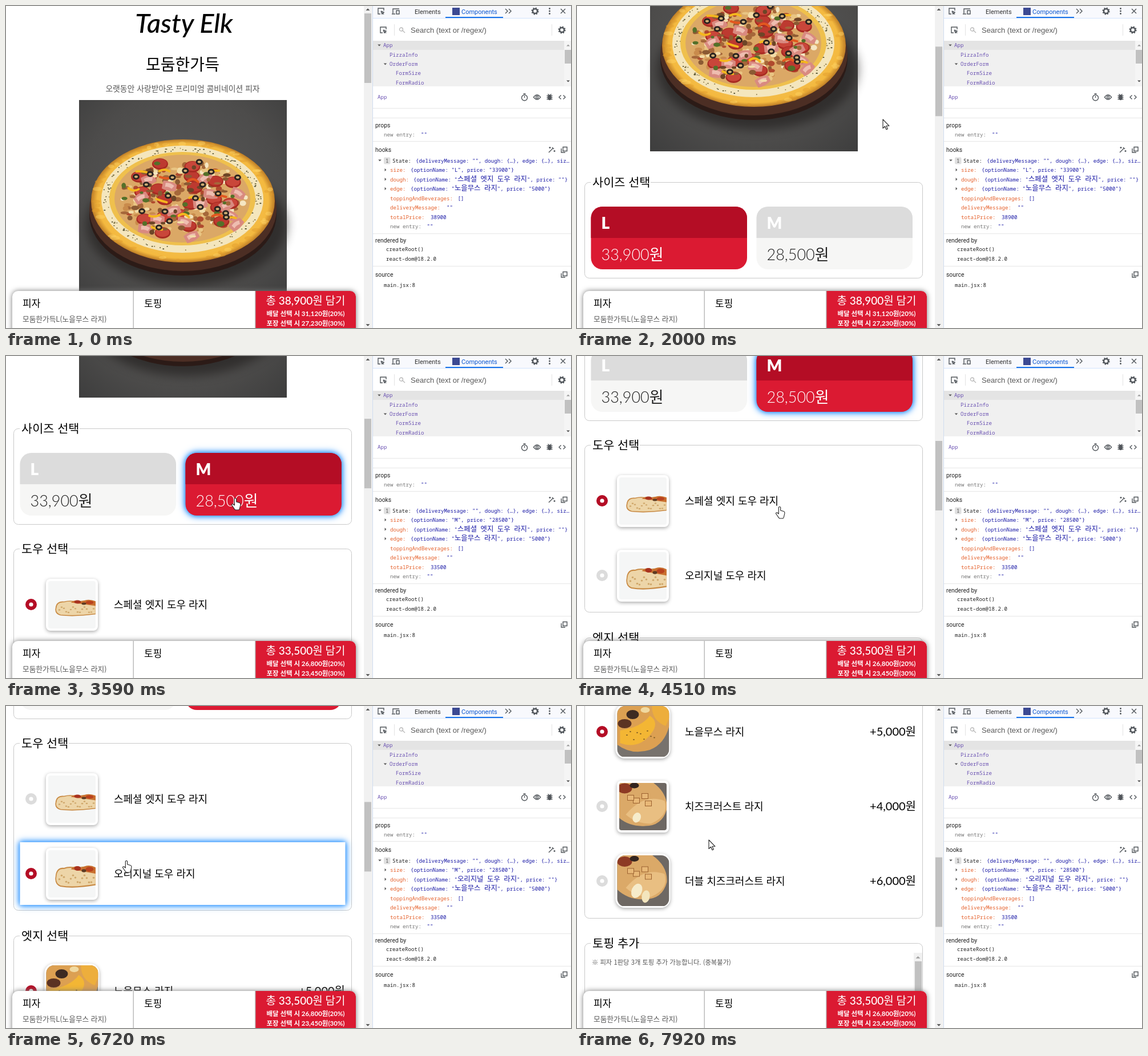
These frames come from a looping animation (990 by 565 pixels, 8000 ms). An HTML page:

```html
<!DOCTYPE html>
<html lang="ko">
<head>
<meta charset="utf-8">
<title>Pizza order form</title>
<style>
html, body { margin: 0; width: 100%; height: 100%; overflow: hidden; background: #fff; }
svg { display: block; }
text { white-space: pre; font-family: "Noto Sans CJK KR", sans-serif; }
.num { font-family: Lato, "Noto Sans CJK KR", sans-serif; }
.ui { font-family: Roboto, sans-serif; }
.arial { font-family: "Liberation Sans", Arial, sans-serif; }
.mono { font-family: "Noto Sans Mono", "Noto Sans CJK KR", monospace; font-size: 9.16px; }
.ko { font-family: "Noto Sans CJK KR", sans-serif; font-size: 12.4px; word-spacing: 3px; }
.glow { filter: drop-shadow(0 0 4px #2b95ff) drop-shadow(0 0 6px #4aa3ff); }
.card { filter: drop-shadow(0 2px 3px #0005); }
.icon { fill: none; stroke: #50555a; stroke-width: 1.4; }
</style>
</head>
<body>
<svg id="stage" width="990" height="565" viewBox="0 0 990 565"></svg>
<script>
const LOOP = 8000;
const RED = '#db1a32', DARK_RED = '#b40d25', GRAY = '#dcdcdc', BLUE = '#1a1aa6', ORANGE = '#e5602b', PURPLE = '#6a51b2';

// Moments of the two clicks and of the later inspector refreshes
const STEPS = [2700, 3590, 5410, 5710];
const SCROLL = [[1440, 0], [1800, 273], [2060, 273], [2480, 455], [3850, 455], [4510, 637],
  [4760, 637], [5010, 728], [6900, 728], [7720, 1183]];
const POINTER = [[180, 842, 462], [980, 561, 171], [1180, 561, 171], [1380, 538, 188], [1800, 538, 188],
  [2000, 536, 199], [2120, 536, 199], [2600, 402, 249], [3860, 402, 249], [4500, 355, 264],
  [4620, 355, 264], [5010, 206, 278], [5190, 206, 278], [5210, 206, 275], [6700, 206, 275],
  [6720, 211, 271], [6920, 211, 271], [7720, 219, 261], [7780, 219, 261], [7920, 231, 235]];

let seed = 11;
const rand = (a = 0, b = 1) => a + (b - a) * ((seed = seed * 16807 % 2147483647) / 2147483647);
const pick = list => list[Math.floor(rand(0, list.length))];
const repeat = (n, make) => Array.from({ length: n }, (_, i) => make(i)).join('');

const rect = (x, y, w, h, fill, more = '') => `<rect x="${x}" y="${y}" width="${w}" height="${h}" fill="${fill}" ${more}/>`;
const oval = (x, y, rx, ry, fill, more = '') => `<ellipse cx="${x}" cy="${y}" rx="${rx}" ry="${ry}" fill="${fill}" ${more}/>`;
const path = (d, fill, more = '') => `<path d="${d}" fill="${fill}" ${more}/>`;
const text = (x, y, s, size, css = '', cls = '') => `<text x="${x}" y="${y}" class="${cls}" style="font-size:${size}px;${css}">${s}</text>`;
const mono = (x, y, s, color) => `<text x="${x}" y="${y}" class="mono" fill="${color}">${
  s.replace(/[가-힣][가-힣 ]*/g, m => `<tspan class="ko">${m}</tspan>`)}</text>`;
const icon = (x, y, d) => `<path class="icon" transform="translate(${x} ${y})" d="${d}"/>`;
const tri = (x, y, w, turn, fill) => path(`M${-w} ${-w / 2}h${2 * w}l${-w} ${w}z`, fill, `transform="translate(${x} ${y}) rotate(${turn})"`);
const line = (y, x = 643) => rect(x, y, 990 - x, 1, '#e6e6e6');
const gear = (x, y) => `<g fill="none" stroke="#50555a" transform="translate(${x} ${y})">
  <circle r="4" stroke-width="2.4"/><circle r="5.6" stroke-width="2" stroke-dasharray="2.2 2.2"/></g>`;

function pizza() {
  const inside = (i, n) => {
    const a = i * 2.4, r = Math.sqrt((i + .5) / n);
    return [309 + 106 * r * Math.cos(a), 338 + 66 * r * Math.sin(a)];
  };
  const scatter = (n, make) => repeat(n, i => make(...inside(i + rand(0, .4), n)));
  const blob = colors => (x, y) => oval(x + rand(-7, 7), y + rand(-4, 4), rand(3, 7), rand(2, 5), pick(colors));
  const ring = repeat(130, () => {
    const a = rand(0, 6.28), k = rand(.94, 1.03);
    return oval(309 + 136 * k * Math.cos(a), 338.5 + 88 * k * Math.sin(a), rand(.7, 2), .9, pick(['#4b4a2c', '#6d6438', '#8d7c4d']));
  });
  const crust = repeat(60, () => {
    const a = rand(0, 6.28), k = rand(.92, .97);
    return oval(310 + 161 * k * Math.cos(a), 342 + 108 * k * Math.sin(a), rand(3, 9), rand(2, 4), pick(['#ffd566', '#e09c2c']), 'opacity=".45"');
  });
  return rect(128, 165, 364, 363, 'url(#slate)')
    + oval(316, 384, 176, 106, '#1d1a19', 'opacity=".6" style="filter:blur(9px)"')
    + oval(310, 366, 164, 107, '#2c1b17') + oval(310, 357, 164, 108, '#4c2e24')
    + oval(310, 342, 161, 108, 'url(#crust)') + crust
    + oval(309, 339, 142, 94, '#f4e6bd') + ring
    + oval(309, 338, 128, 82, '#efc04d') + oval(309, 338, 119, 77, '#dba866')
    + scatter(190, blob(['#f2dda8', '#e9c583', '#8b5a33', '#a5673a', '#c98b4c', '#f5e6c2', '#b04a2e']))
    + scatter(21, (x, y) => oval(x, y, 14, 10, '#a82a22') + oval(x, y - 1, 12, 8, pick(['#c9463a', '#bd3a30'])))
    + scatter(15, (x, y) => `<g transform="translate(${x + 12} ${y + 9}) rotate(${rand(-40, 40)})">${
      path('M-13 -7Q0 -11 12 -6L13 5Q0 10 -12 7Z', '#d98a80')}${path('M-8 -4Q0 -7 8 -3L5 3Q-2 0 -7 3Z', '#eebdb0')}</g>`)
    + scatter(55, blob(['#8b5a33', '#6d4527', '#f2dda8', '#a5673a', '#547029']))
    + scatter(14, (x, y) => path(`M${x - 9} ${y - 4}q9 ${rand(-9, 9)} 18 ${rand(-2, 6)}`, 'none', `stroke="${pick(['#f5b71e', '#f5b71e', '#e2571f'])}" stroke-width="4" stroke-linecap="round"`))
    + scatter(20, (x, y) => oval(x + 6, y - 8, 4.5, 3.6, '#cfae74', 'stroke="#2a2320" stroke-width="3"'));
}

// Thumbnails are drawn around their own centre
function slice(big) {
  const h = big ? 1.35 : 1;
  return rect(-42, -42, 84, 84, '#f5f6f6') + `<g transform="translate(0 ${big ? 4 : 5}) scale(1 ${h})">`
    + path('M-28 1Q-27 -11 -14 -10Q-4 -13 10 -10Q26 -14 42 -9V11Q5 16 -20 13Q-30 10 -28 1Z', '#edd5a8', 'stroke="#c88a44" stroke-width="1.6"')
    + repeat(16, i => oval(-22 + i * 4, 4 + Math.sin(i * 5) * 5, 1.8, 1.2, '#cfa76b'))
    + path('M-2 -9Q8 -16 16 -10Q28 -17 42 -11V-3Q20 -6 -2 -9Z', '#c9702f')
    + oval(10, -10, 6, 3, '#a8321f') + oval(31, -9, 7, 3, '#b9421f') + oval(21, -7, 4, 2, '#5d3a22') + '</g>';
}
function gold() {
  return rect(-46, -46, 92, 92, '#77726d')
    + path('M-46 -46H46V-8Q38 24 12 34Q-20 44 -46 24Z', '#dca052')
    + path('M-40 22Q-8 34 14 6Q30 -14 12 -26Q-2 -6 -40 0Z', '#f3b634')
    + path('M16 -46Q14 -18 40 -8L46 -22V-46Z', '#edae3c')
    + oval(-32, -12, 12, 8, '#5b3323') + oval(-18, -28, 11, 8, '#3d2a22') + oval(4, -36, 8, 5, '#f0d9a0')
    + repeat(9, i => oval(-28 + i * 6, 8 + Math.sin(i * 4) * 8, 1.4, 1, '#7b5a24'));
}
function cheese(big) {
  return rect(-46, -46, 92, 92, '#6e6863') + path('M-46 -46H12Q44 -26 42 4Q34 34 4 34Q-26 36 -46 16Z', '#dba968')
    + path('M-30 14Q2 -24 38 -10Q46 16 14 30Q-12 30 -30 14Z', '#e9bf82')
    + oval(-32, -32, 13, 9, '#8d3a24') + oval(-15, -37, 8, 5, '#33241f')
    + [[-17, -15], [-2, -23], [4, -10], [-27, -20]].map(([x, y]) => rect(x, y, 11, 9, '#e8b877', 'stroke="#9c6230"')).join('')
    + oval(-2, 22, big ? 9 : 7, big ? 13 : 9, '#f6eccb', 'transform="rotate(24)"')
    + (big ? oval(10, 28, 7, 11, '#f3e5bd', 'transform="rotate(10)"') : '');
}
const thumb = (y, art, large) => `<g transform="translate(115.5 ${y})">${
  large ? rect(-48, -46, 96, 95, '#fff', 'rx="16" class="card"') : rect(-45.5, -45.5, 91, 91, '#fff', 'rx="8" class="card"')
}<g clip-path="url(#${large ? 'large' : 'small'})">${art}</g></g>`;

const PIZZA = pizza();

function fieldset(top, bottom, title, width) {
  return rect(13.5, top + .5, 592, bottom - top, 'none', 'rx="8" stroke="#c9c9c9"')
    + rect(24, top - 4, width, 10, '#fff') + text(27, top + 8, title, 20.8, 'font-weight:500');
}
function sizeCard(x, name, price, on, focus) {
  const head = `M${x} 680V645a20 20 0 0 1 20 -20h233.500a20 20 0 0 1 20 20V680Z`;
  return rect(x, 625, 273.5, 110, on ? RED : '#f6f6f5', `rx="20" class="${focus ? 'glow' : ''}"`)
    + path(head, on ? DARK_RED : GRAY)
    + text(x + 18, 664, name, 28, 'font-weight:900;fill:#fff', 'num')
    + text(x + 18, 719, price + '원', 27, `font-weight:300;fill:${on ? '#fff' : '#222'}`, 'num');
}
function row(y, name, art, { on, focus, extra, large }) {
  return (focus ? rect(24.5, y - 55, 570, 110, '#fff', 'class="glow"') : '')
    + `<circle cx="44" cy="${y}" r="6.8" fill="#fff" stroke="${on ? DARK_RED : GRAY}" stroke-width="6.4"/>`
    + thumb(large ? y - 2 : y + .5, art, large) + text(189, y + 6.500, name, 18)
    + (extra ? text(594, y + 6.500, `+${extra}원`, 20, 'text-anchor:end', 'num') : '');
}

function page(step) {
  const medium = step > 0, original = step > 2;
  return text(312, 47, 'Tasty Elk', 47, 'font-style:italic;font-weight:500;text-anchor:middle', 'num')
    + text(309.5, 113, '모둠한가득', 28, 'font-weight:500;text-anchor:middle')
    + text(309.5, 150, '오랫동안 사랑받아온 프리미엄 콤비네이션 피자', 13.85, 'fill:#555;text-anchor:middle')
    + PIZZA
    + fieldset(582, 750, '사이즈 선택', 105)
    + sizeCard(24.5, 'L', '33,900', !medium) + sizeCard(314.5, 'M', '28,500', medium, medium && !original)
    + fieldset(793, 1086, '도우 선택', 86)
    + row(891, '스페셜 엣지 도우 라지', slice(), { on: !original })
    + row(1022, '오리지널 도우 라지', slice(true), { on: original, focus: original })
    + fieldset(1131, 1555, '엣지 선택', 86)
    + row(1228, '노을무스 라지', gold(), { on: true, extra: '5,000', large: true })
    + row(1359, '치즈크러스트 라지', cheese(), { extra: '4,000' })
    + row(1490, '더블 치즈크러스트 라지', cheese(true), { extra: '6,000', large: true })
    + fieldset(1599, 2100, '토핑 추가', 86)
    + text(26, 1637, '※ 피자 1판당 3개 토핑 추가 가능합니다. (중복불가)', 11.3, 'fill:#555')
    + rect(590, 1616, 15, 300, '#f1f1f1') + tri(597.5, 1624, 4, 180, '#a3a3a3') + rect(592, 1631, 12, 200, '#c1c1c1');
}

function bar(step) {
  const [total, delivery, pickup] = step > 0 ? ['33,500', '26,800', '23,450'] : ['38,900', '31,120', '27,230'];
  const red = (y, s, size, weight) => text(525, y, s, size, `fill:#fff;font-weight:${weight};text-anchor:middle`, 'num');
  return rect(11, 500, 602, 90, '#fff', 'rx="10" style="filter:drop-shadow(0 0 5px #777)"')
    + path('M437 565V500H603a10 10 0 0 1 10 10V565Z', RED)
    + rect(222.5, 500, 1.5, 65, '#bbb') + rect(436, 500, 1.5, 65, '#bbb')
    + text(29, 528, '피자', 17, 'font-weight:500') + text(242, 528, '토핑', 17, 'font-weight:500')
    + text(29, 554, '모둠한가득L(노을무스 라지)', 12.7, 'fill:#555')
    + red(524, `총 ${total}원 담기`, 19, 500)
    + red(544, `배달 선택 시 ${delivery}원(20%)`, 11.5, 700)
    + red(561, `포장 선택 시 ${pickup}원(30%)`, 11.5, 700);
}

function devtools(step) {
  const medium = step > 1, original = step > 3;
  const heading = (y, s) => text(647, y, s, 10.4, 'fill:#222', 'ui');
  const entry = (y, name, x, value, color = ORANGE) => mono(x > 740 || name != 'new entry' ? 673 : 662, y, name + ':', color) + mono(x, y, value, BLUE);
  const option = (y, name, x, label, price) => tri(665, y - 3.500, 2.800, -90, '#555') + entry(y, name, x, `{optionName: "${label}", price: "${price}"}`);
  const copy = 'M-2 -4.500h7v7h-7zM-5 -2v7h7';
  const pointAt = 'M5 -1V-5H-5V5H-1M0 0l5 2l-2 1l2 2.500M0 0l2 5l1 -2';
  return rect(642, 0, 348, 565, '#fff') + rect(642, 0, 1, 565, '#cfdcf0')
    + rect(643, 0, 347, 21, '#f8f9fd') + rect(643, 21, 347, 1, '#d3e3fd') + rect(770, 19, 101, 2, '#1a73e8')
    + icon(657, 9, pointAt) + icon(683, 9, 'M-5 4V-4H6M-7 5h6M1 -1h5v6h-5z')
    + text(716, 13.500, 'Elements', 11, 'fill:#333', 'ui') + rect(782, 3, 13, 13, '#3c4a93')
    + text(798, 13.500, 'Components', 11, 'fill:#0b57d0', 'ui') + icon(880, 9, 'M-5 -4l4 4l-4 4M1 -4l4 4l-4 4')
    + gear(927, 9) + [4.500, 9, 13.500].map(y => oval(952.500, y, 1.4, 1.4, '#50555a')).join('') + icon(976, 9, 'M-4 -4l8 8M4 -4l-8 8')
    + icon(661, 42, pointAt) + rect(680, 32, 1, 20, '#e3e3e3') + icon(693, 41, 'M2.500 0a3 3 0 1 1 -6 0a3 3 0 1 1 6 0M2 2l4 4')
      .replace('class="icon"', 'class="icon" style="stroke:#bbb"')
    + text(709, 46.500, 'Search (text or /regex/)', 13, 'fill:#5a5a5a', 'arial') + rect(956, 32, 1, 20, '#e3e3e3') + gear(974, 42)
    + rect(643, 61, 335, 80, '#f0f0f0') + rect(643, 61, 335, 16, '#e4e4e4')
    + rect(978, 61, 12, 80, '#f5f5f5') + rect(979, 77, 11, 24, '#c1c1c1') + tri(985, 69, 3, 180, '#999') + tri(985, 132, 3, 0, '#505050')
    + tri(654, 69, 2.800, 0, '#555') + tri(664.500, 102, 2.800, 0, '#555')
    + [[661, 'App'], [672, 'PizzaInfo'], [672, 'OrderForm'], [683, 'FormSize'], [683, 'FormRadio']]
      .map(([x, s], i) => mono(x, 72.300 + i * 16.300, s, PURPLE)).join('')
    + mono(651, 163, 'App', PURPLE)
    + icon(908.500, 161, 'M5 0a5 5 0 1 1 -10 0a5 5 0 1 1 10 0M0 0V-3M-2 -7h4')
    + icon(930.500, 160, 'M-6 0Q0 -8 6 0Q0 8 -6 0ZM2 0a2 2 0 1 1 -4 0a2 2 0 1 1 4 0')
    + oval(952.500, 160.500, 3.200, 4.800, '#50555a') + icon(952.500, 160.500, 'M-5 -3H5M-5 0H5M-5 3H5M-3 -6l2 2M3 -6l-2 2')
    + icon(974.500, 160, 'M-2 -3.500l-3.500 3.500l3.500 3.500M2 -3.500l3.500 3.500l-3.500 3.500')
    + line(179) + line(196) + heading(212.500, 'props') + entry(228.500, 'new entry', 727, '""', '#777')
    + line(237) + heading(256, 'hooks') + icon(956, 252, 'M-5 5L3 -3M1 -4l3 3M-3 -5v3M-4.500 -3.500h3M5 1v3M3.500 2.500h3') + icon(978, 252, copy)
    + tri(655, 271, 2.800, 0, '#555') + rect(662, 265.500, 11.500, 12, '#e0e0e0', 'rx="2"') + mono(665, 274.500, '1', '#555')
    + mono(677, 274.500, 'State:', '#222') + mono(718, 274.500, '{deliveryMessage: "", dough: {…}, edge: {…}, siz…', BLUE)
    + option(291, 'size', 709, medium ? 'M' : 'L', medium ? 28500 : 33900)
    + option(307.500, 'dough', 714, original ? '오리지널 도우 라지' : '스페셜 엣지 도우 라지', '')
    + option(324, 'edge', 709, '노을무스 라지', 5000)
    + entry(340.500, 'toppingAndBeverages', 791.500, '[]') + entry(357, 'deliveryMessage', 772, '""')
    + entry(373.500, 'totalPrice', 744, medium ? '33500' : '38900')
    + mono(673, 390, 'new entry:', '#777') + mono(737.500, 390, '""', BLUE)
    + line(399) + heading(415, 'rendered by') + mono(666, 430, 'createRoot()', '#222') + mono(666, 446.500, 'react-dom@18.2.0', '#222')
    + line(456) + heading(475, 'source') + icon(978, 471, copy) + mono(662, 493, 'main.jsx:8', '#222');
}

const DEFS = `<defs>
  <radialGradient id="slate" cx=".5" cy=".45" r=".75"><stop stop-color="#595959"/><stop offset=".65" stop-color="#4d4c4b"/><stop offset="1" stop-color="#3d3d3d"/></radialGradient>
  <radialGradient id="crust"><stop offset=".86" stop-color="#f3bb45"/><stop offset=".93" stop-color="#f4b93f"/><stop offset="1" stop-color="#bd7c26"/></radialGradient>
  <clipPath id="small">${rect(-41.5, -41.5, 83, 83, '#000', 'rx="4"')}</clipPath>
  <clipPath id="large">${rect(-45, -43, 91, 90, '#000', 'rx="14"')}</clipPath></defs>`;
const ARROW = 'M0 0V15.500L3.600 12.200L6 17.800L8.300 16.800L6 11.300H11Z';
const HAND = 'M-1.700 1.500Q0 -.5 1.700 1.500V7L7 8.500Q9 9 9 11.500L8 16Q7.500 20 6 21H0Q-2 20 -3 17.500L-6.500 12.500Q-6.500 10 -4 11L-1.700 13Z';

const $ = id => document.getElementById(id);
function at(keys, t) {
  const i = keys.findIndex(k => k[0] > t);
  if (i < 1) return (i ? keys[keys.length - 1] : keys[0]).slice(1);
  const a = keys[i - 1], b = keys[i], u = (t - a[0]) / (b[0] - a[0]), e = u * u * (3 - 2 * u);
  return a.slice(1).map((v, j) => v + (b[j + 1] - v) * e);
}

let shown = -1;
function build(step) {
  shown = step;
  $('stage').innerHTML = DEFS + `<g id="page">${page(step)}</g>` + bar(step)
    + rect(627, 0, 15, 565, '#f1f1f1') + tri(634, 6, 3.500, 180, '#505050') + tri(634, 560, 3.500, 0, '#505050')
    + rect(628, 13, 12, 122, '#c1c1c1', 'id="thumb"') + devtools(step)
    + path(ARROW, '#fff', 'id="pointer" stroke="#222" stroke-width="1.1" stroke-linejoin="round"');
}

function frame(now) {
  const t = now % LOOP, step = STEPS.filter(s => t >= s).length;
  if (step !== shown) build(step);
  const [scroll] = at(SCROLL, t), [x, y] = at(POINTER, t), pointer = $('pointer');
  $('page').setAttribute('transform', `translate(0 ${-scroll})`);
  $('thumb').setAttribute('y', 13 + scroll * .2135);
  pointer.setAttribute('d', t > 2350 && t < 7870 ? HAND : ARROW);
  pointer.setAttribute('transform', `translate(${x} ${y})`);
  pointer.setAttribute('visibility', t < 180 ? 'hidden' : 'visible');
  requestAnimationFrame(frame);
}
frame(performance.now());
</script>
</body>
</html>
```
